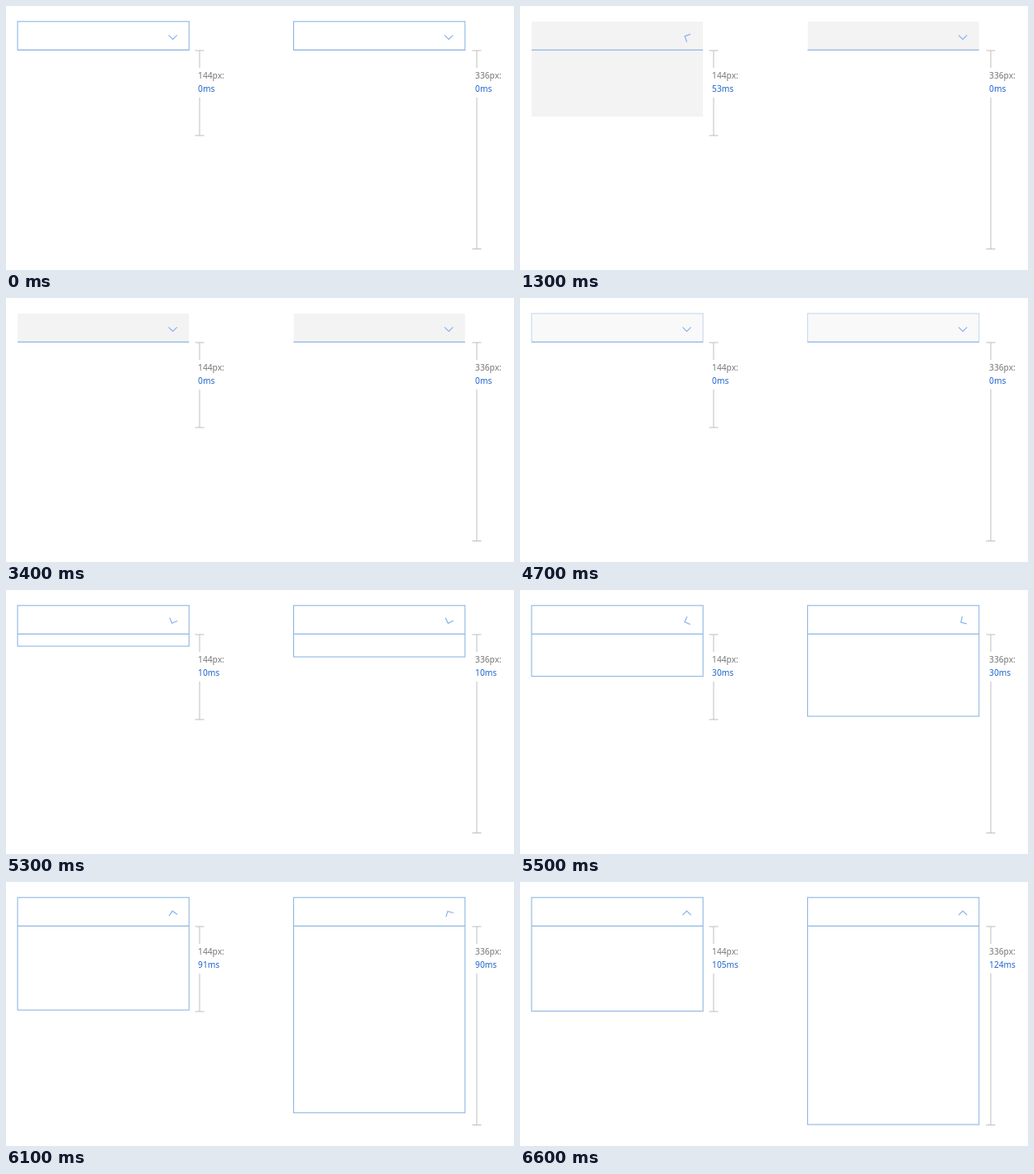
An HTML page with a canvas for the animation above (7200 ms loop, 614 px wide and 320 px high).

```html
<!DOCTYPE html>
<html lang="en">
<head>
<meta charset="utf-8">
<title>Dropdown timing</title>
<style>
  html, body { margin: 0; width: 100%; height: 100%; overflow: hidden; background: #fff; }
  canvas { display: block; width: 614px; height: 320px; }
</style>
</head>
<body>
<canvas id="stage"></canvas>
<script>
const W = 614, H = 320, LOOP = 7200, STEP = 100;
const TOP = 18.8, BASE = 53.4, WIDTH = 207.2;
const BLUE = '#8fb7e3', GRAY = '#f3f3f3', RULE = '#bebebe';

const menus = [
  { x: 14, ruleX: 234, textX: 232.1, label: '144px:', open: 103.1, ruleEnd: 157, dur: 105, start: 1247, rate: 0.1013 },
  { x: 347.6, ruleX: 569, textX: 567.1, label: '336px:', open: 240.6, ruleEnd: 294.5, dur: 124, start: 1985, rate: 0.1 }
];
const CLOSE = 3250, SLOW = 5200;

const canvas = document.getElementById('stage');
const ctx = canvas.getContext('2d');
const dpr = window.devicePixelRatio || 1;
canvas.width = W * dpr;
canvas.height = H * dpr;

const clamp = (v, lo, hi) => Math.min(hi, Math.max(lo, v));

function bezier(x1, y1, x2, y2) {
  const at = (a, b, s) => 3 * (1 - s) * (1 - s) * s * a + 3 * (1 - s) * s * s * b + s * s * s;
  return p => {
    if (p <= 0 || p >= 1) return clamp(p, 0, 1);
    let lo = 0, hi = 1;
    for (let i = 0; i < 30; i++) {
      const mid = (lo + hi) / 2;
      if (at(x1, x2, mid) < p) lo = mid; else hi = mid;
    }
    return at(y1, y2, lo);
  };
}
const slide = bezier(0.19, 0.2, 0.38, 1);
const spin = bezier(0.2, 0.25, 0.6, 0.87);

// Share of the filled style: 0 is outlined, 1 is filled.
function fillAmount(t) {
  return clamp((t - 150) / 100, 0, 1) * (1 - clamp((t - 4650) / 100, 0, 1));
}

function pose(m, t) {
  if (t >= CLOSE && t < SLOW) {
    const ms = clamp(t - CLOSE, 0, m.dur), p = ms / m.dur;
    return { ms: m.dur - ms, height: 1 - slide(p), turn: 1 - spin(p) };
  }
  const raw = t < CLOSE ? t - m.start : (t - SLOW) * m.rate;
  const ms = clamp(raw, 0, m.dur), p = ms / m.dur;
  return { ms, height: slide(p), turn: spin(p) };
}

function line(color, width, ...pts) {
  ctx.strokeStyle = color;
  ctx.lineWidth = width;
  ctx.beginPath();
  pts.forEach(([x, y], i) => i ? ctx.lineTo(x, y) : ctx.moveTo(x, y));
  ctx.stroke();
}

function drawBox(m, height, fill) {
  const bottom = BASE + m.open * height;
  if (fill > 0) {
    ctx.globalAlpha = fill;
    ctx.fillStyle = GRAY;
    ctx.fillRect(m.x + 0.1, TOP, WIDTH - 0.2, bottom - TOP);
  }
  if (fill < 1) {
    ctx.globalAlpha = 1 - fill;
    ctx.strokeStyle = BLUE;
    ctx.lineWidth = 1.1;
    ctx.strokeRect(m.x, TOP, WIDTH, bottom - TOP);
  }
  ctx.globalAlpha = 1;
  line(BLUE, 1.1, [m.x, BASE], [m.x + WIDTH, BASE]);
}

function drawChevron(m, turn) {
  ctx.save();
  ctx.translate(m.x + 187.6, 37.8);
  ctx.rotate(Math.PI * turn);
  line('#8ab2ec', 1.2, [-5.1, -2.4], [0, 2.7], [5.1, -2.4]);
  ctx.restore();
}

function drawRule(m) {
  const x = m.ruleX;
  for (const y of [54, m.ruleEnd]) line(RULE, 1, [x - 5.5, y], [x + 5.5, y]);
  line(RULE, 1, [x, 54], [x, 75]);
  line(RULE, 1, [x, 111], [x, m.ruleEnd]);
}

function drawText(m, ms) {
  ctx.font = '10.2px "Noto Sans", "Open Sans", sans-serif';
  ctx.fillStyle = '#777';
  ctx.fillText(m.label, m.textX, 88);
  ctx.fillStyle = '#1f66cc';
  ctx.fillText(Math.round(ms) + 'ms', m.textX, 103.8);
}

function draw(t) {
  ctx.setTransform(dpr, 0, 0, dpr, 0, 0);
  ctx.fillStyle = '#fff';
  ctx.fillRect(0, 0, W, H);
  const fill = fillAmount(t);
  for (const m of menus) {
    const p = pose(m, t);
    drawBox(m, p.height, fill);
    drawChevron(m, p.turn);
    drawRule(m);
    drawText(m, p.ms);
  }
}

const begin = performance.now();
function tick() {
  const t = (performance.now() - begin) % LOOP;
  draw(Math.floor(t / STEP) * STEP);
  requestAnimationFrame(tick);
}
tick();
</script>
</body>
</html>
```
